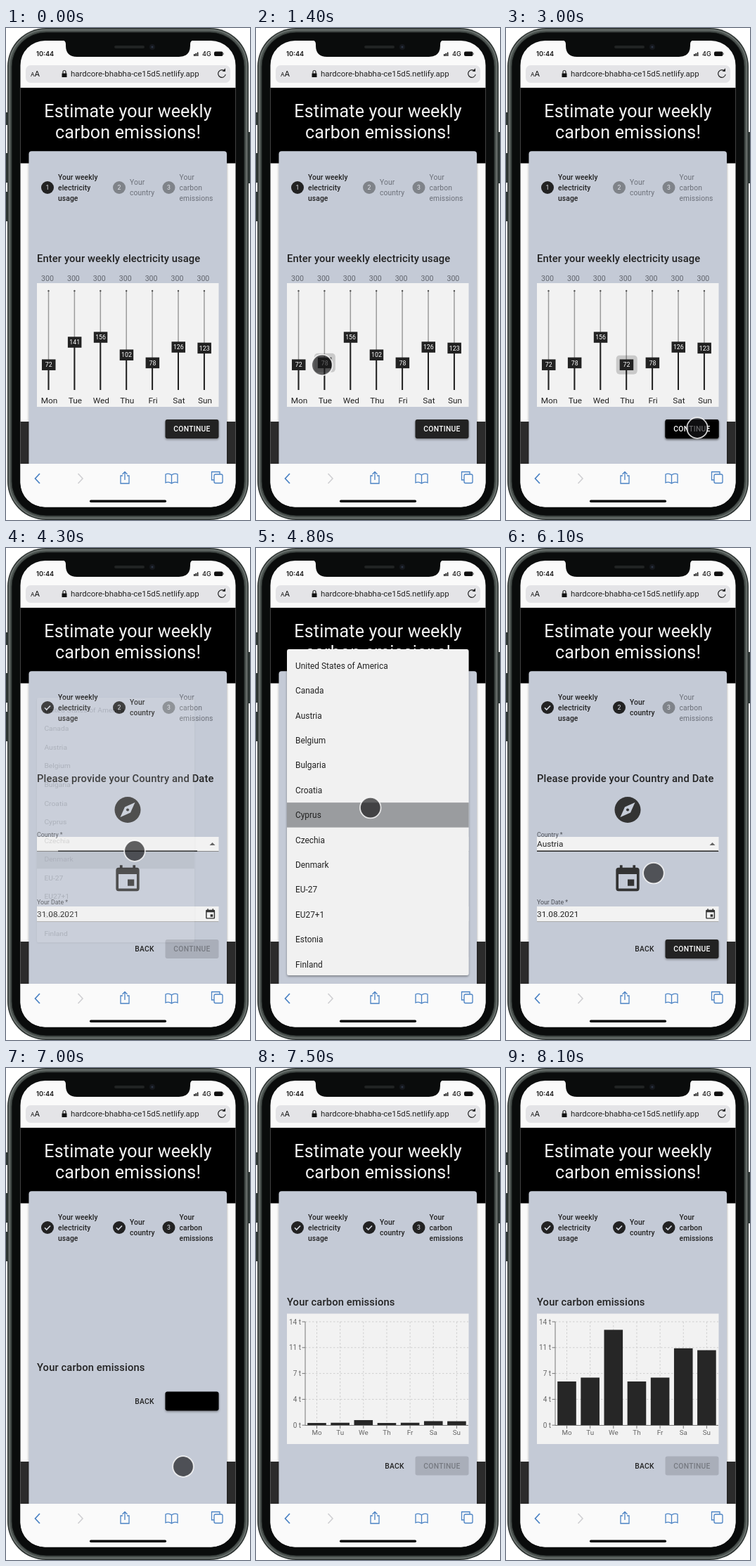
Write an HTML page that moves like this. It is 347 px wide and 700 px high and loops after 8800 ms.

```html
<!DOCTYPE html>
<html lang="en">
<head>
<meta charset="utf-8">
<title>Carbon emissions estimate</title>
<style>
html, body { margin: 0; width: 100%; height: 100%; overflow: hidden; background: #fff }
svg { display: block; width: 347px; height: 700px; font-family: Roboto, sans-serif }
</style>
</head>
<body>
<svg viewBox="0 0 347 700">
  <defs>
    <filter id="shade" x="-20%" y="-20%" width="140%" height="150%">
      <feDropShadow dx="0" dy="1.5" stdDeviation="1.8" flood-opacity=".4"/>
    </filter>
    <clipPath id="screen"><rect x="20.5" y="18" width="306" height="663.500" rx="35"/></clipPath>
    <clipPath id="view"><rect x="20" y="85" width="307" height="535"/></clipPath>
  </defs>
  <path d="M1 120V138M1 178V220M1 233V275M346 148V221" stroke="#2c3533" stroke-width="2"/>
  <rect x="2" width="343" height="700" rx="55" fill="#2a302e"/>
  <rect x="4.500" y="2.500" width="338" height="695" rx="52.500" fill="#4b524f" stroke="#6a716e" stroke-width="2"/>
  <rect x="8" y="6" width="331" height="688" rx="49" fill="#0a0c0c" stroke="#2a302e"/>
  <g clip-path="url(#screen)">
    <rect x="20" y="18" width="307" height="664" fill="#fafafa"/>
    <g id="page" clip-path="url(#view)"></g>
    <rect x="28" y="53" width="291" height="25" rx="7" fill="#e4e4e7"/>
    <g font-family="Inter, sans-serif" fill="#111">
      <text x="43" y="40" font-size="9.2" font-weight="600">10:44</text>
      <text x="279" y="40" font-size="9" font-weight="500">4G</text>
      <text x="35" y="69" font-size="8">A</text><text x="40.5" y="69" font-size="11">A</text>
    </g>
    <text x="92" y="69" font-size="11.450" fill="#222">hardcore-bhabha-ce15d5.netlify.app</text>
    <path d="M79.500 64.500h7v5.500h-7zM267 37h1.600v3H267zm2.400-1h1.600v4h-1.600zm2.400-1.500h1.600V40h-1.600z" fill="#111"/>
    <path d="M81 65v-2.500a2 2 0 0 1 4 0V65M311 61.500a5.300 5.300 0 1 0 1.200 4.500" fill="none" stroke="#222" stroke-width="1.200"/>
    <path d="M307.500 61.800h4.500v-4.500z" fill="#222"/>
    <rect x="296" y="33.500" width="12.500" height="6.500" rx="2" fill="#111"/><path d="M309.500 35.500v2.500" stroke="#999"/>
    <rect x="20" y="620" width="307" height="62" fill="#fafafa"/>
    <g fill="none" stroke="#4a82c4" stroke-width="1.300">
      <path d="M48 634l-6.500 7 6.500 7" stroke-width="1.700"/>
      <path d="M102.500 634l6.500 7-6.500 7" stroke="#d0d0d3" stroke-width="1.700"/>
      <path d="M166 637h-3v11h12v-11h-3M169 643v-11.500m-3.500 3.500l3.500-3.500 3.500 3.500"/>
      <path d="M235.500 636q-4-3-8.500-1v12q4.500-2 8.500 1 4-3 8.500-1v-12q-4.500-2-8.500 1v12"/>
      <path d="M296 643h-3.500v-11.500h11.500v3.500"/><rect x="296" y="635" width="12" height="12.500" rx="2"/>
    </g>
    <rect x="119" y="671.500" width="109" height="3.500" rx="1.700" fill="#000"/>
  </g>
  <path d="M80 17q5 1 5 6v2q0 16 16 16H246q16 0 16-16v-2q0-5 5-6z" fill="#0a0c0c"/>
  <rect x="154" y="25" width="43" height="4" rx="2" fill="#202323"/>
  <circle cx="208" cy="27" r="4" fill="#15181d"/><circle cx="208" cy="27" r="1.500" fill="#2b3444"/>
</svg>
<script>
const LOOP = 8800, DARK = '#222', PANEL = '#f2f2f2';
const page = document.getElementById('page');
const clamp = v => Math.max(0, Math.min(1, v));
const span = (t, a, b) => clamp((t - a) / (b - a));
const ease = p => p * p * (3 - 2 * p);
const mix = (a, b, p) => a + (b - a) * p;

const rect = (x, y, w, h, fill, more = '') =>
  `<rect x="${x}" y="${y}" width="${w}" height="${h}" fill="${fill}" ${more}/>`;
const text = (x, y, s, size, fill = DARK, more = '') =>
  `<text x="${x}" y="${y}" font-size="${size}" fill="${fill}" ${more}>${s}</text>`;
const line = (d, stroke, width = 1, more = '') =>
  `<path d="${d}" fill="none" stroke="${stroke}" stroke-width="${width}" ${more}/>`;
const group = (body, more) => `<g ${more}>${body}</g>`;
const MID = 'text-anchor="middle"', BOLD = 'font-weight="500"';

const DAYS = ['Mon', 'Tue', 'Wed', 'Thu', 'Fri', 'Sat', 'Sun'];
const USAGE = [72, 141, 156, 102, 78, 126, 123];
const COUNTRIES = ['United States of America', 'Canada', 'Austria', 'Belgium', 'Bulgaria', 'Croatia',
  'Cyprus', 'Czechia', 'Denmark', 'EU-27', 'EU27+1', 'Estonia', 'Finland'];
const STEPS = [
  [59, ['Your weekly', 'electricity', 'usage']],
  [161, ['Your', 'country']],
  [231.5, ['Your', 'carbon', 'emissions']]
];
// touch path: time, x, y
const TOUCH = [[300, 122, 510], [400, 116, 500], [600, 110, 495], [1100, 94, 479.5], [1400, 94, 479.5],
  [2100, 171, 479], [2300, 171, 479], [2900, 272, 569], [3200, 272, 569], [4000, 183, 431],
  [4500, 183, 431], [5300, 119, 237], [5600, 119, 237], [6400, 252, 567], [LOOP, 252, 567]];

function touchAt(t) {
  const i = Math.max(1, TOUCH.findIndex(k => k[0] > t));
  const [a, x, y] = TOUCH[i - 1], [b, u, v] = TOUCH[i];
  const p = ease(span(t, a, b));
  return [mix(x, u, p), mix(y, v, p)];
}

function stepper(active) {
  return STEPS.map(([x, words], i) => {
    const on = i <= active;
    const top = 230.8 - (words.length - 1) * 7.35;
    return `<circle cx="${x}" cy="227" r="9" fill="${on ? DARK : '#7f8389'}"/>` +
      (i < active ? line(`M${x - 4} 227.300l2.700 2.700 5.300-5.500`, '#d5d9e2', 1.6)
        : text(x, 230, i + 1, 8.8, '#e3e6ec', MID)) +
      words.map((w, j) => text(x + 15, top + j * 14.7, w, 10.3, on ? DARK : '#6c7079',
        (on ? BOLD : '') + ' letter-spacing=".1"')).join('');
  }).join('');
}

function sliders(t) {
  const tapped = [0, 1400, 0, 2300];
  const values = USAGE.map((v, i) => tapped[i] && t >= tapped[i] ? [0, 78, 0, 72][i] : v);
  const focus = t >= 2300 ? 3 : t >= 1400 ? 1 : -1;
  return rect(44, 363, 258.5, 176, PANEL) + values.map((v, i) => {
    const x = 60.5 + i * 36.9, y = 512.7 - v * .466;
    return text(x - 1.5, 359.5, 300, 10.6, '#62666e', MID) +
      line(`M${x} 374V515`, '#9b9b9b', 1.5) + line(`M${x} ${y}V515`, DARK, 2) +
      `<circle cx="${x}" cy="374" r="1.200" fill="#555"/>` +
      (i == focus ? rect(x - 14.5, y - 13.5, 30, 27, 'rgba(0,0,0,.17)', 'rx="5"') : '') +
      rect(x - 9.5, y - 7.7, 19.5, 15.5, DARK) + text(x + .3, y + 3.2, v, 8.8, '#fff', MID) +
      text(x + 1, 534, DAYS[i], 11.8, DARK, MID);
  }).join('');
}

const calendar = (x, y, s) => group(
  `<path d="M19 3h-1V1h-2v2H8V1H6v2H5a2 2 0 0 0-2 2v14a2 2 0 0 0 2 2h14a2 2 0 0 0 2-2V5a2 2 0 0 0-2-2zm0 16H5V8h14zM12 12h5v5h-5z" fill="#333" fill-rule="evenodd"/>`,
  `transform="translate(${x} ${y}) scale(${s})"`);

function form(t) {
  const up = ease(span(t, 4150, 4300));
  const half = 129 * Math.sqrt(span(t, 4200, 4370));
  return `<circle cx="173" cy="372.500" r="18.500" fill="#333"/>
    <path d="M183.500 362l-6.500 14.500-14.500 6.500 6.500-14.500z" fill="#c6ccd8"/><circle cx="173" cy="372.500" r="2" fill="#333"/>` +
    rect(44, 411, 258.5, 20, PANEL) + line('M44 431.500H302.500', '#888') +
    line(`M${173 - half} 431.300H${173 + half}`, DARK, 1.6) +
    text(44, mix(425, 410.5, up), 'Country *', mix(11.8, 8.8, up), '#4d5057') +
    (t >= 5600 ? text(44, 425, 'Austria', 11.8) : '') +
    `<path d="M289.500 ${up ? 423 : 419.5}h8l-4 ${up ? -4 : 4}z" fill="#666"/>` +
    calendar(150.8, 449.3, 1.85) +
    text(44, 506.5, 'Your Date *', 8.8, '#4d5057') + rect(44, 510, 258.5, 22, PANEL) +
    line('M44 531.500H302.500', '#aaa') + text(44, 525, '31.08.2021', 11.8) + calendar(282, 512.5, .72);
}

function chart(t) {
  const grow = ease(span(t, 7400, 8100));
  const tops = [446, 440.5, 372.5, 446, 440.5, 398.8, 401.5];
  const dash = 'stroke-dasharray="2.500 2.500"';
  return rect(44, 349.5, 258.5, 185.5, PANEL) +
    [14, 11, 7, 4, 0].map((v, i) => {
      const y = 361 + i * 36.8;
      return line(`M70 ${y}H302`, '#cfcfcf', 1, dash) + line(`M65.500 ${y}H70`, '#777') +
        text(64, y + 3.6, v + ' t', 10, '#666', 'text-anchor="end"');
    }).join('') +
    tops.map((top, i) => {
      const x = 86.5 + i * 33.15, h = (508.5 - top) * grow;
      return line(`M${x} 361V508`, '#cfcfcf', 1, dash) + line(`M${x} 508V513`, '#777') +
        rect(x - 13.3, 508.5 - h, 26.6, h, '#262626') + text(x, 522, DAYS[i].slice(0, 2), 9.8, '#666', MID);
    }).join('') + line('M70 361V508.500H302', '#777');
}

function button(y, enabled, black) {
  const label = MID + ' font-weight="500" letter-spacing=".3"';
  const box = (fill, more) => rect(226.5, y - 13.5, 76, 27, fill, 'rx="3" ' + more);
  return box(enabled ? DARK : '#a9aeb9', enabled ? 'filter="url(#shade)"' : '') +
    (black ? box('#000', `opacity="${black}" filter="url(#shade)"`) : '') +
    text(264.5, y + 3.8, 'CONTINUE', 10.3, enabled ? '#fff' : 'rgba(0,0,0,.3)', label);
}

function menu(t, y) {
  if (t < 4200 || t >= 5800) return '';
  const opacity = t < 5000 ? span(t, 4200, 4600) ** 1.4 : 1 - span(t, 5500, 5800) ** 2;
  const s = .75 + .25 * (t < 5000 ? ease(span(t, 4200, 4410)) : 1 - ease(span(t, 5600, 5900)));
  const local = 420 + (y - 420) / (s * s);
  const hover = t >= 5600 ? 2 : Math.round((local - 167.5) / 35.4);
  const items = COUNTRIES.map((name, i) => {
    const cy = 167.5 + i * 35.4;
    return (i == hover ? rect(44, cy - 17.7, 258.5, 35.4, 'rgba(0,8,16,.36)') : '') +
      text(56, cy + 4.2, name, 11.9);
  }).join('');
  return group(rect(44, 144, 258.5, 464, '#f1f1f1', 'rx="3" filter="url(#shade)"') + items,
    `opacity="${opacity}" transform="translate(44 420) scale(${s} ${s * s}) translate(-44 -420)"`);
}

function draw(t) {
  const step = t < 3200 ? 0 : t < 7000 ? 1 : 2;
  const open = [1, ease(span(t, 3200, 3600)), ease(span(t, 7100, 7500))][step];
  const low = mix(474, step < 2 ? 570.5 : 566, open), high = mix(426, step < 2 ? 328 : 333, open);
  const heading = ['Enter your weekly electricity usage', 'Please provide your Country and Date', 'Your carbon emissions'][step];
  const enabled = step == 0 || step == 1 && t >= 5800;
  const black = step == 0 ? +(t >= 2900) : step == 1 ? (t >= 6400 ? 1 : 1 - span(t, 3200, 3450)) : 1 - span(t, 7050, 7300);
  const [x, y] = touchAt(t);
  const shown = span(t, 200, 400) * (1 - span(t, 7000, 7400));
  const body = [sliders, form, chart][step](t);
  const top = high + 14;
  page.innerHTML =
    rect(20, 85, 307, 107.5, '#000') + rect(20, 560, 307, 60, '#2b2b2b') +
    rect(32.5, 175.3, 281.5, 460, '#c4cad6', 'rx="4" filter="url(#shade)"') +
    ['Estimate your weekly', 'carbon emissions!'].map((s, i) =>
      text(173.5, 126.5 + i * 30.5, s, 25, '#f4f4f4', MID + ' letter-spacing=".18"')).join('') +
    stepper(t >= 7700 ? 3 : step) +
    text(44, high + 5, heading, 14.7, DARK, BOLD + ' letter-spacing=".14"') +
    `<clipPath id="fold"><rect x="33" y="${top}" width="281" height="${Math.max(0, low - 14 - top)}"/></clipPath>` +
    group(body, `clip-path="url(#fold)" opacity="${open}"`) +
    (step ? text(197, low + 3.8, 'BACK', 10.3, DARK, MID + ' font-weight="500" letter-spacing=".3"') : '') +
    button(low, enabled, black) + menu(t, y) +
    `<circle cx="${x}" cy="${y}" r="14.800" fill="rgba(22,22,24,.67)" stroke="rgba(255,255,255,.8)" stroke-width="1.800" opacity="${shown}"/>`;
}

const start = performance.now();
function tick() {
  const t = (performance.now() - start) % LOOP;
  draw(Math.floor(t / 100) * 100);
  requestAnimationFrame(tick);
}
tick();
</script>
</body>
</html>
```
